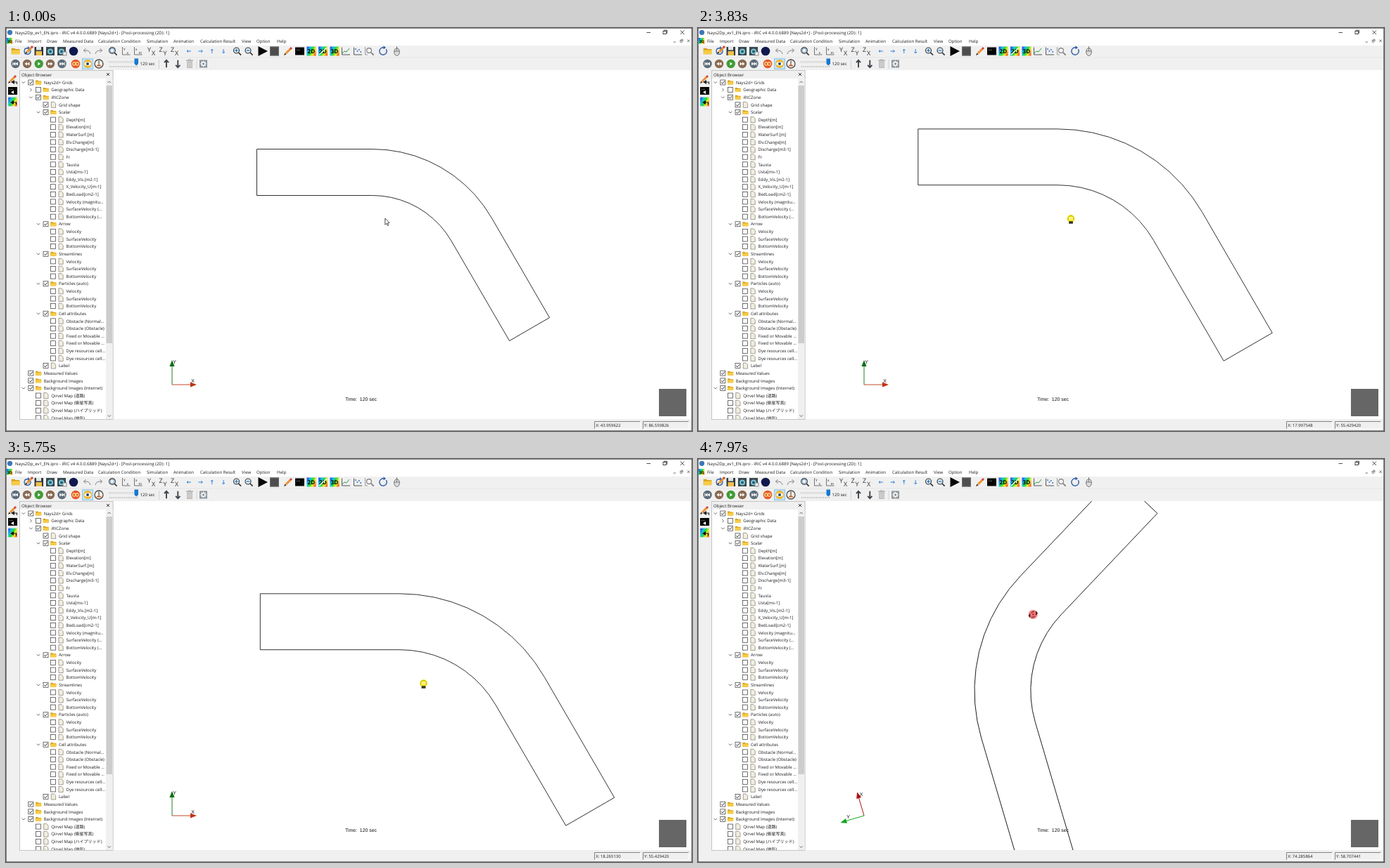
Recreate the animation shown at these times as an HTML page with a canvas. Size 975x574 px, loop 8000 ms.

```html
<!DOCTYPE html>
<html lang="en">
<head>
<meta charset="utf-8">
<title>Post-processing view</title>
<style>
html, body { margin: 0; width: 100%; height: 100%; overflow: hidden; background: #fff; }
canvas { display: block; }
</style>
</head>
<body>
<canvas id="stage" width="975" height="574"></canvas>
<script>
const W = 975, H = 574, LOOP = 8000;
const UI = '"Open Sans", "Noto Sans CJK JP", "Noto Sans CJK", sans-serif';
const VIEW = { x: 153, y: 60, w: 821, h: 497, cx: 564, cy: 309 };
const screen = document.getElementById('stage').getContext('2d');
const chrome = document.createElement('canvas');
chrome.width = W;
chrome.height = H;
let g = chrome.getContext('2d');

// ---------- drawing helpers ----------
function rect(x, y, w, h, fill) { g.fillStyle = fill; g.fillRect(x, y, w, h); }
function frame(x, y, w, h, color, lw = 0.8) {
  g.strokeStyle = color; g.lineWidth = lw; g.strokeRect(x, y, w, h);
}
function trace(p) {
  g.beginPath();
  for (let i = 0; i < p.length; i += 2) g.lineTo(p[i], p[i + 1]);
}
function line(color, lw, ...p) { trace(p); g.strokeStyle = color; g.lineWidth = lw; g.stroke(); }
function poly(fill, ...p) { trace(p); g.fillStyle = fill; g.fill(); }
function disc(x, y, r, fill) { g.beginPath(); g.arc(x, y, r, 0, 7); g.fillStyle = fill; g.fill(); }
function arc(x, y, r, color, lw, from = 0, to = 2 * Math.PI) {
  g.beginPath(); g.arc(x, y, r, from, to);
  g.strokeStyle = color; g.lineWidth = lw; g.stroke();
}
function text(s, x, y, size = 6.05, fill = '#1c1c1c', family = UI, style = '') {
  g.font = `${style} ${size}px ${family}`;
  g.textRendering = 'geometricPrecision';
  g.fillStyle = fill;
  g.fillText(s, x, y);
}
function at(x, y, angle, draw) {
  g.save(); g.translate(x, y); g.rotate(angle); draw(); g.restore();
}

// ---------- icons ----------
function arrow(x, y, angle, color, size, lw) {
  at(x, y, angle, () => {
    line(color, lw, -size, 0, size, 0);
    line(color, lw, size * 0.35, -size * 0.6, size, 0, size * 0.35, size * 0.6);
  });
}
function rainbow(x, y, s, label) {
  const grad = g.createLinearGradient(x - s, y - s / 2, x + s, y + s / 2);
  ['#2a50e8', '#10c8d8', '#28d838', '#f6ee20', '#f05a20'].forEach((c, i) => grad.addColorStop(i / 4, c));
  rect(x - s, y - s, 2 * s, 2 * s, grad);
  if (label) text(label, x - s + 1, y + 3, s * 1.25, '#000', UI, 'bold');
}
function folder(x, y, s = 1) {
  poly('#d9a11c', x - 4 * s, y - 3 * s, x - s, y - 3 * s, x, y - 2 * s, x + 4 * s, y - 2 * s, x + 4 * s, y + 3 * s, x - 4 * s, y + 3 * s);
  poly('#f7cc45', x - 4 * s, y + 3 * s, x - 3.4 * s, y - s, x + 4.4 * s, y - s, x + 4 * s, y + 3 * s);
}
function page(x, y) {
  trace([x - 3, y - 4, x + 1, y - 4, x + 3.3, y - 1.7, x + 3.3, y + 4, x - 3, y + 4]);
  g.closePath();
  g.fillStyle = '#f1eee0'; g.fill();
  g.strokeStyle = '#807c6c'; g.lineWidth = 0.7; g.stroke();
}
function checkbox(x, y, on) {
  rect(x - 3.5, y - 3.5, 7, 7, '#fff');
  frame(x - 3.5, y - 3.5, 7, 7, '#333', 0.7);
  if (on) line('#222', 0.9, x - 2.2, y, x - 0.6, y + 1.8, x + 2.4, y - 1.8);
}
function chevron(x, y, angle) {
  at(x, y, angle, () => line('#444', 0.8, -2.2, -1.1, 0, 1.1, 2.2, -1.1));
}
function lens(x, y, sign, r = 4, color = '#333') {
  line(color, 1.7, x + 2, y + 2, x + 5.6, y + 5.6);
  disc(x - 1, y - 1, r, sign ? '#dbeaf5' : '#f6f6f6');
  arc(x - 1, y - 1, r, color, 1.1);
  if (sign) line('#1668b0', 1.1, x - 3.2, y - 1, x + 1.2, y - 1);
  if (sign === '+') line('#1668b0', 1.1, x - 1, y - 3.2, x - 1, y + 1.2);
}
function pencil(x, y) {
  line('#f0902c', 3, x - 3, y + 3, x + 3.5, y - 3.5);
  line('#d04848', 3, x + 3, y - 3, x + 5, y - 5);
  poly('#3a2a18', x - 6, y + 6, x - 4.6, y + 2.4, x - 2.4, y + 4.6);
}
function terminal(x, y) {
  rect(x - 6.5, y - 5.5, 13, 11, '#050505');
  text('• •', x - 4.5, y - 0.5, 4.5, '#fff');
}
function circleArrow(x, y, r, color) {
  arc(x, y, r, color, 1.4, -0.6, 4.9);
  poly(color, x + 0.5, y - r - 2.6, x + 4, y - r + 0.2, x + 0.5, y - r + 2.4);
}
function curl(x, y, flip) {
  g.save(); g.translate(x, y); g.scale(flip, 1);
  line('#777', 0.9, -1.5, -4, -4.5, -1, -1.5, 2);
  g.beginPath(); g.moveTo(-4.5, -1); g.quadraticCurveTo(4, -2, 5, 4); g.stroke();
  g.restore();
}
function camera(x, y) {
  rect(x - 6, y - 6, 12, 12, '#37474f');
  disc(x, y + 0.5, 4, '#7fc4cf');
  disc(x, y + 0.5, 2, '#20617a');
}
function axisPair(x, y, a, b) {
  line('#555', 0.8, x - 5.5, y - 6, x - 5.5, y + 5, x + 5.5, y + 5);
  text(a, x - 4, y - 1, 4.8);
  text(b, x + 0.5, y + 4, 4.8);
}
function chart(x, y, zigzag) {
  line('#444', 0.9, x - 5.5, y - 5.5, x - 5.5, y + 5, x + 6, y + 5);
  if (zigzag) line('#2c9c50', 1, x - 5, y + 3, x - 2, y, x + 1, y + 1, x + 5, y - 4);
  else for (let i = 0; i < 4; i++) disc(x - 3 + i * 2.4, y - 3 + (i * 3) % 5, 0.9, '#2865c0');
}
function transport(x, color, glyph) {
  const y = 51;
  disc(x, y, 6.2, color);
  const tri = (cx, d) => poly('#fff', cx - 1.7 * d, y - 2.6, cx + 1.9 * d, y, cx - 1.7 * d, y + 2.6);
  const d = '<['.includes(glyph) ? -1 : 1;
  if (glyph === 'p') tri(x + 0.4, 1);
  else { tri(x - 1.7, d); tri(x + 1.7, d); }
  if ('[]'.includes(glyph)) rect(x + d * 3.7 - 0.4, y - 2.5, 0.9, 5, '#fff');
}

// ---------- window parts ----------
function titleAndMenu() {
  rect(0, 0, W, 25, '#fff');
  disc(5.5, 6.3, 3.6, '#3c78b8');
  text('Nays2Dp_ev1_EN.ipro - iRIC v4 4.0.0.6889 [Nays2d+] - [Post-processing (2D): 1]', 13, 8.6);
  line('#222', 0.8, 910.5, 6.5, 916, 6.5);
  frame(934, 4.4, 4.2, 4.2, '#222'); line('#222', 0.8, 935.3, 4, 935.3, 3.1, 939.5, 3.1, 939.5, 7.3, 938.6, 7.3);
  line('#222', 0.8, 958.5, 3.5, 964, 9); line('#222', 0.8, 964, 3.5, 958.5, 9);
  line('#555', 0.8, 948.5, 20, 952, 20);
  frame(958.2, 17.5, 2.6, 2.6, '#555', 0.7); line('#555', 0.7, 959.3, 16.2, 962, 16.2, 962, 19);
  line('#555', 0.8, 968.3, 16.5, 971.7, 20); line('#555', 0.8, 971.7, 16.5, 968.3, 20);
  rainbow(5, 18.3, 4.2, '3D');
  const menu = { File: 13, Import: 31, Draw: 58, 'Measured Data': 81, 'Calculation Condition': 131, Simulation: 200,
    Animation: 238, 'Calculation Result': 276, View: 335, Option: 356, Help: 385 };
  for (const name in menu) text(name, menu[name], 20.6);
}

function mainToolbar() {
  const y = 33;
  folder(13.5, y, 1.45);
  page(29.5, y); circleArrow(30.5, y, 4.5, '#2c66b8'); pencil(33, y - 2);
  rect(40.5, y - 6, 12.5, 12, '#33383d'); rect(43, y - 6, 7, 4.5, '#dfe6ea'); rect(42.5, y, 8.5, 6, '#f0c14a');
  camera(63, y); camera(79, y); rect(81, y + 1, 5, 6, '#eee'); frame(81, y + 1, 5, 5, '#777');
  disc(96, y, 6.3, '#10184e');
  curl(115, y, 1); curl(132, y, -1);
  lens(152, y, '', 4.4); frame(148.5, y - 3.5, 5, 5, '#5a8fc0');
  axisPair(171, y, 'Y', 'x'); axisPair(188, y, 'x', 'm');
  [['YX', 207], ['ZY', 223.5], ['ZX', 240]].forEach(([s, x]) => {
    text(s[0], x - 6, y + 1, 9, '#333'); text(s[1], x, y + 6, 9, '#333');
  });
  [Math.PI, 0, -Math.PI / 2, Math.PI / 2].forEach((a, i) => arrow(260 + i * 16.4, y, a, '#2b7fe0', 2.9, 1));
  lens(328.5, y, '+'); lens(345, y, '-');
  poly('#050505', 358.5, y - 7, 372, y, 358.5, y + 7);
  rect(375, y - 6.5, 13, 13, '#4d4d4d'); frame(375.4, y - 6.1, 12.2, 12.2, '#777');
  pencil(401, y); terminal(417.5, y);
  ['2D', '2D', '3D'].forEach((s, i) => rainbow(434 + i * 16.5, y, 6.5, s));
  line('#fff', 1.4, 445, y + 5, 456, y - 5);
  chart(483, y, true); chart(500, y, false);
  line('#888', 0.8, 510.5, y - 6, 510.5, y + 5, 514, y + 5); lens(517, y, '', 3.4, '#777');
  circleArrow(536, y, 5.2, '#2a5aa8');
  g.beginPath(); g.ellipse(555.5, y + 1, 3.8, 5.5, 0, 0, 7);
  g.fillStyle = '#ddd'; g.fill(); g.strokeStyle = '#666'; g.lineWidth = 0.9; g.stroke();
  line('#666', 0.8, 552, y, 559, y); line('#666', 0.8, 555.5, y, 555.5, y - 7);
}

function playToolbar() {
  const y = 51;
  transport(13.5, '#5c6b78', '[');
  transport(30, '#8a6a52', '<');
  transport(46.7, '#3f9c35', 'p');
  transport(63, '#8a6a52', '>');
  transport(79.5, '#5c6b78', ']');
  disc(99, y, 6.3, '#e8582c');
  arc(96.8, y, 2.1, '#ffe08a', 1.1); arc(101.2, y, 2.1, '#ffe08a', 1.1);
  rect(108, 43.5, 16, 15.5, '#c4e2f8'); frame(108.4, 43.9, 15.2, 14.7, '#7fbde8');
  disc(116, y, 6, '#f0b428');
  g.beginPath(); g.ellipse(116, y, 4.8, 2.8, 0, 0, 7); g.fillStyle = '#fff'; g.fill();
  disc(116, y, 2, '#20476a');
  disc(132, y, 6, '#f4efe8'); arc(132, y, 6, '#4a4a4a', 1.3);
  line('#333', 1, 132, y - 4.5, 132, y); poly('#c86a3c', 128, y + 3.6, 136, y + 3.6, 132, y);
  rect(146, 47.2, 42, 2, '#e2e2e2'); frame(146, 47.2, 42, 2, '#cfcfcf', 0.4);
  for (let x = 147; x < 188; x += 2.6) rect(x, 54.2, 0.9, 1.6, '#999');
  poly('#1878d0', 182.5, 43.5, 188, 43.5, 188, 51, 185.2, 53.5, 182.5, 51);
  text('120 sec', 190.5, 53.2);
  line('#ccc', 0.8, 217.5, 45, 217.5, 58); line('#ccc', 0.8, 271, 45, 271, 58);
  arrow(228, y, -Math.PI / 2, '#3c444c', 5.2, 1.9);
  arrow(244.3, y, Math.PI / 2, '#3c444c', 5.2, 1.9);
  rect(257, y - 3.5, 8, 9.5, '#bdbdbd'); rect(256, y - 5.5, 10, 1.5, '#adadad'); rect(259, y - 6.5, 4, 1, '#adadad');
  for (let i = 0; i < 3; i++) rect(258.6 + i * 2.1, y - 2, 0.7, 6.5, '#e8e8e8');
  rect(275, y - 5.5, 11, 11, '#8b949b'); arc(280.5, y, 2.4, '#fff', 1.5);
  for (let i = 0; i < 8; i++) disc(280.5 + 3.8 * Math.cos(i * Math.PI / 4), y + 3.8 * Math.sin(i * Math.PI / 4), 0.7, '#fff');
}

function sideToolbar() {
  pencil(9, 73); poly('#222', 7, 77, 12, 74, 12, 80); line('#222', 1.1, 11, 77, 15.5, 77, 15.5, 80);
  terminal(9.5, 89.5); poly('#fff', 7, 91.5, 11, 89, 11, 94);
  rainbow(9.5, 105, 6.3); poly('#111', 6, 106, 11, 103, 11, 109); line('#111', 1.2, 10, 106, 14.5, 106, 14.5, 109);
}

// Row code: level, expander (v, > or -), check (x or o), icon (f or p), label
const branch = (name, ...kids) => ['2vxf' + name, ...kids.map(k => '3-op' + k)];
const flow = name => branch(name, 'Velocity', 'SurfaceVelocity', 'BottomVelocity');
const rows = [
  '0vxfNays2d+ Grids', '1>ofGeographic Data', '1vxfiRICZone', '2-xpGrid shape',
  ...branch('Scalar', 'Depth[m]', 'Elevation[m]', 'WaterSurf.[m]', 'Elv.Change[m]', 'Discharge[m3-1]', 'Fr', 'Tausta',
    'Usta[ms-1]', 'Eddy_Vis.[m2-1]', 'X_Velocity_U[m-1]', 'BedLoad[cm2-1]', 'Velocity (magnitu...',
    'SurfaceVelocity (...', 'BottomVelocity (...'),
  ...flow('Arrow'), ...flow('Streamlines'), ...flow('Particles (auto)'),
  ...branch('Cell attributes', 'Obstacle (Normal...', 'Obstacle (Obstacle)', 'Fixed or Movable ...',
    'Fixed or Movable ...', 'Dye resources cell...', 'Dye resources cell...'),
  '2-xpLabel', '0-xfMeasured Values', '0-xfBackground Images', '0vxfBackground Images (Internet)',
  ...['道路', '衛星写真', 'ハイブリッド', '地形'].map(s => `1-opQirvel Map (${s})`)
];

function objectBrowser() {
  frame(19.5, 60.5, 132.5, 497, '#bbb');
  text('Object Browser', 22, 68.6);
  line('#222', 0.9, 143, 64, 147, 68); line('#222', 0.9, 147, 64, 143, 68);
  rect(20, 72, 122, 485, '#fff');
  g.save();
  g.beginPath(); g.rect(20, 72, 122, 485); g.clip();
  rows.forEach((row, i) => {
    const y = 77.5 + i * 10.62, x = 35.3 + row[0] * 10.6;
    if (row[1] !== '-') chevron(x - 10.5, y, row[1] === 'v' ? 0 : -Math.PI / 2);
    checkbox(x, y, row[2] === 'x');
    (row[3] === 'f' ? folder : page)(x + 10.8, y);
    text(row.slice(4), x + 18.4, y + 2.2);
  });
  g.restore();
  rect(142, 72, 9.5, 485, '#f0f0f0');
  rect(142.5, 82, 8.5, 367, '#cdcdcd');
  chevron(146.7, 77, Math.PI);
  chevron(146.7, 552.5, 0);
}

function paintChrome() {
  rect(0, 0, W, H, '#f0f0f0');
  titleAndMenu();
  line('#dcdcdc', 0.6, 0, 42, W, 42);
  mainToolbar();
  playToolbar();
  sideToolbar();
  objectBrowser();
  rect(VIEW.x, VIEW.y, VIEW.w, VIEW.h, '#fff');
  rect(928, 514, 39, 39, '#666');
  for (const x of [836.5, 905.5]) {
    line('#777', 0.9, x, 571, x, 560.5, x + 65, 560.5);
    line('#fff', 0.9, x, 571, x + 65, 571, x + 65, 560.5);
  }
  frame(0.25, 0.25, W - 0.5, H - 0.5, '#333', 0.7);
}

// ---------- motion ----------
const ZOOM = [[0, 0], [890, -2], [1090, -4], [1390, -6], [1910, -4], [2210, -2], [2510, 0], [3110, 2]];
const PAN = [[3830, 0, 0], [3930, -15, 0], [4130, -135, 0], [4230, -158, 0], [4330, -130, 0], [4530, 32, 0], [4630, 71, 0],
  [4830, 71, 0], [4930, 65, -75], [5030, 59.5, -123], [5130, 57, -151], [5230, 56, -160], [5330, 54, -120], [5530, 50, 20],
  [5630, 48.5, 44], [5750, 48.5, 48], [5850, 48.5, 48], [6050, 14.5, -15]];
const POINTER = [[6350, 565, 256], [6550, 627, 267], [6850, 655, 259]];
const SPIN = [[7150, 0], [7250, 5], [7970, 106.4]];
// Pointer position in model units, counted in steps of UNIT
const UNIT = 0.26758127;
const READ_X = [[3830, 0], [4030, -20], [4230, 0], [4430, 24], [4630, 0], [5030, 2], [5750, 1], [6250, 1], [6550, 39],
  [6850, 55], [7150, 55], [7970, 210.359699]];
const READ_Y = [[4630, 0], [5030, 13], [5230, 4], [5430, -25], [5630, -8], [5750, 0], [5950, 12], [6050, 4], [6250, 4],
  [6550, -4], [6850, 0], [7150, 0], [7970, 12.250561]];

// The picture ticks every 100 ms, with one 120 ms tick in each 1920 ms.
function tick(ms) {
  const u = ms + 10;
  const t = Math.floor(u / 1920) * 1920 + Math.min(18, Math.floor(u % 1920 / 100)) * 100 - 10;
  return Math.max(0, t);
}
function track(keys, t) {
  const i = keys.findIndex(k => k[0] > t);
  if (i === 0) return keys[0].slice(1);
  if (i < 0) return keys[keys.length - 1].slice(1);
  const a = keys[i - 1], b = keys[i], f = (t - a[0]) / (b[0] - a[0]);
  return a.slice(1).map((v, j) => v + (b[j + 1] - v) * f);
}

// Channel outline at zoom 1, relative to the view centre
function channel() {
  const bend = (r, back) => {
    const p = [];
    for (let i = 0; i <= 10; i++) {
      const a = (back ? 10 - i : i) * Math.PI / 30;
      p.push(-44 + r * Math.sin(a), 59.5 - r * Math.cos(a));
    }
    return p;
  };
  return [-208, -136.5, ...bend(196), 208, 103.5, 151, 136.5, ...bend(130, true), -208, -70.5];
}
const OUTLINE = channel();

function drawChannel(t, spin) {
  const zoom = 1.1 ** ZOOM.filter(k => k[0] <= t).pop()[1];
  const [dx, dy] = track(PAN, t);
  g.save();
  g.beginPath(); g.rect(VIEW.x, VIEW.y, VIEW.w, VIEW.h); g.clip();
  g.translate(VIEW.cx + 0.5, VIEW.cy);
  g.rotate(-spin);
  g.translate(dx, dy);
  trace(OUTLINE.map(v => v * zoom));
  g.closePath();
  g.strokeStyle = '#1a1a1a'; g.lineWidth = 0.9; g.stroke();
  g.restore();
}

function drawAxes(spin) {
  const ox = 236, oy = 508, f = spin / 1.857;
  const mix = (a, b) => `rgb(${a.map((v, i) => Math.round(v + (b[i] - v) * f))})`;
  const axis = (angle, label, color, reach) => {
    at(ox, oy, -angle, () => {
      line(color, 0.9, 0, 0, 26, 0);
      poly(color, 26, -3.6, 35, 0, 26, 3.6);
    });
    g.textAlign = 'center';
    text(label, ox + reach * Math.cos(angle) + 3.5, oy - reach * Math.sin(angle) - 3.4, 7, '#111', '"Liberation Sans", sans-serif');
    g.textAlign = 'left';
  };
  axis(spin, 'X', mix([190, 52, 18], [172, 16, 16]), 26);
  axis(spin + Math.PI / 2, 'Y', mix([14, 112, 22], [16, 166, 26]), 27);
}

function drawArrow(x, y) {
  trace([x, y, x, y + 9.2, x + 2.1, y + 7.3, x + 3.6, y + 10.6, x + 5, y + 9.9, x + 3.5, y + 6.8, x + 6.3, y + 6.6]);
  g.closePath();
  g.fillStyle = '#fff'; g.fill();
  g.strokeStyle = '#222'; g.lineWidth = 0.8; g.stroke();
}
function drawHand(x, y) {
  disc(x, y, 5.4, '#f4e90c');
  for (let i = 0; i < 4; i++) line('#fff6a0', 1.3, x - 2.6 + i * 1.7, y - 2.6, x - 2.6 + i * 1.7, y + 2);
  arc(x, y, 4.2, '#a89a10', 0.7, 2.6, 6.8);
  rect(x - 2.9, y + 3.8, 5.8, 3.4, '#33302a');
}
function drawTurn(x, y) {
  disc(x, y, 6.4, '#f37878');
  at(x, y, -0.7, () => {
    g.beginPath(); g.ellipse(0, 0, 6, 3.2, 0, 0, 7);
    g.setLineDash([5, 2]); g.strokeStyle = '#3a2020'; g.lineWidth = 1; g.stroke();
    g.setLineDash([]);
    poly('#3a2020', -6.8, -2.5, -3, -3.8, -5, 0.5);
    poly('#3a2020', 6.8, 2.5, 3, 3.8, 5, -0.5);
  });
  disc(x, y, 1.2, '#a03030');
}

function drawPointer(t, spin) {
  if (t < 3510) drawArrow(538.8, 271);
  else if (t < 6350) {
    // The view trails the hand by one tick
    const [dx, dy] = track(PAN, t + 100);
    drawHand(545 + dx, 271.5 + dy);
  } else if (t < 7150) drawArrow(...track(POINTER, t));
  else {
    const a = 0.5 + spin, r = 104 + spin * 10.8;
    drawTurn(VIEW.cx + r * Math.cos(a), VIEW.cy - r * Math.sin(a));
  }
}

function drawReadout(t) {
  let x = 43.959622, y = 86.559826;
  if (t >= 3510) {
    const snap = t < 7150 ? Math.round : v => v;
    x = 17.9975484 + UNIT * snap(track(READ_X, t)[0]);
    y = 55.4294204 + UNIT * snap(track(READ_Y, t)[0]);
  }
  text('X: ' + x.toFixed(6), 838.3, 568, 5.95);
  text('Y: ' + y.toFixed(6), 907, 568, 5.95);
}

function render(now) {
  const t = tick(now % LOOP);
  const spin = track(SPIN, t)[0] * Math.PI / 180;
  g.drawImage(chrome, 0, 0);
  drawChannel(t, spin);
  drawAxes(spin);
  text('Time:  120 sec', 482, 531, 6.9, '#111', '"Liberation Sans", sans-serif');
  drawPointer(t, spin);
  drawReadout(t);
}

paintChrome();
g = screen;
const start = performance.now();
function loop() {
  render(Math.max(0, performance.now() - start));
  requestAnimationFrame(loop);
}
loop();
</script>
</body>
</html>
```
